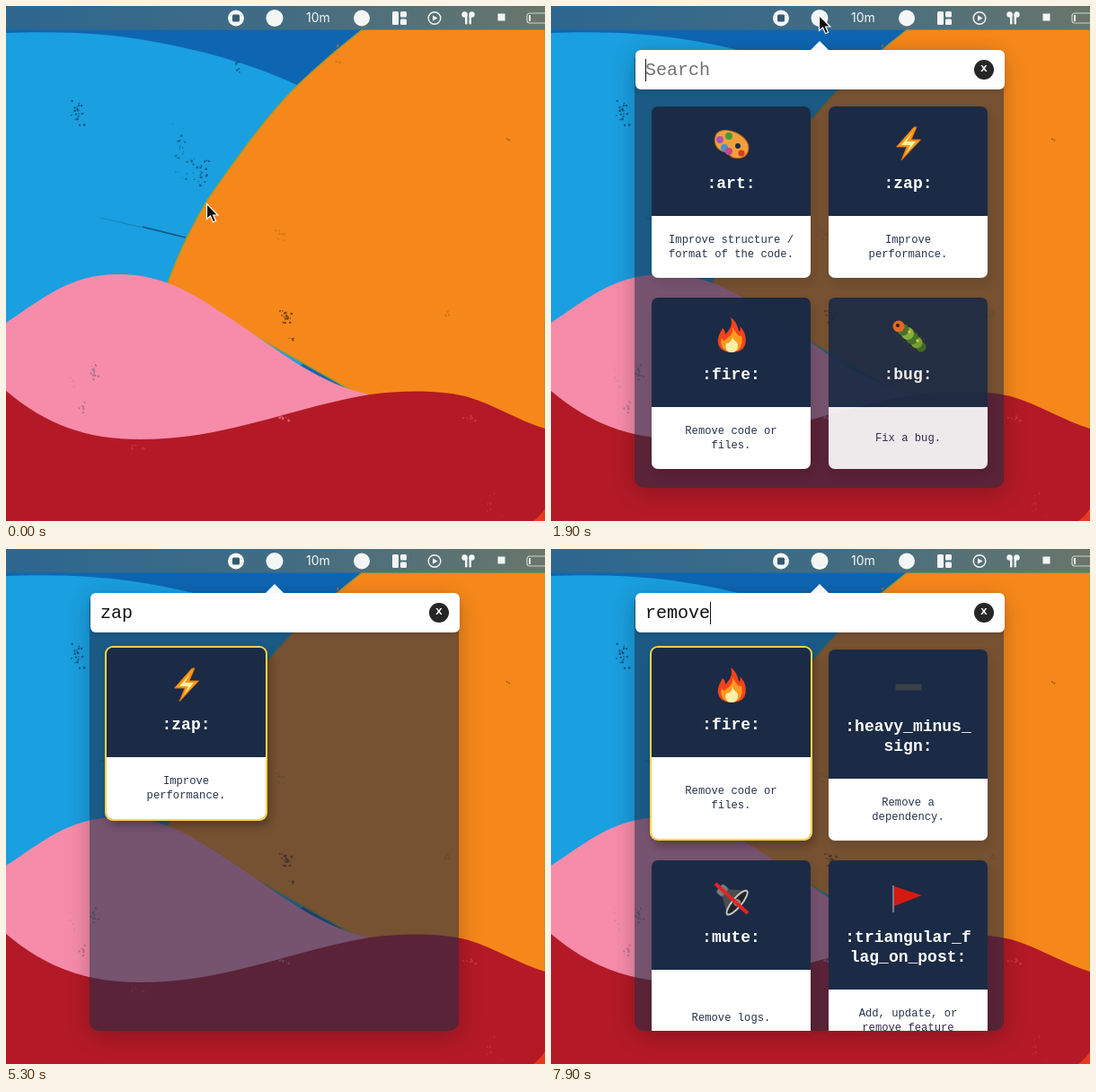
An HTML page for the animation above (8 s loop, 600 by 574 pixels).

```html
<!DOCTYPE html>
<html lang="en">
<head>
<meta charset="utf-8">
<title>Emoji search popup</title>
<style>
  html, body { margin: 0; width: 100%; height: 100%; overflow: hidden; }
  #stage { position: relative; width: 600px; height: 574px; overflow: hidden; font-family: "Liberation Mono", monospace; }
  #stage > svg, #popup, #popup > * { position: absolute; }
  #stage > svg { left: 0; top: 0; }
  #panel { left: 93px; top: 49px; width: 411px; height: 488px; border-radius: 10px;
    background: rgba(26, 42, 68, .58); overflow: hidden; }
  #shade { left: 93px; top: 49px; width: 411px; height: 488px; border-radius: 10px; }
  #grid { position: absolute; left: 19px; top: 63px; display: grid; grid-template-columns: 177px 177px; gap: 22px 20px; }
  #bar { left: 93.5px; top: 49px; width: 411px; height: 44px; border-radius: 6px; background: #fff;
    box-shadow: 0 2px 5px rgba(0, 0, 0, .12); }
  #tip { left: 288px; top: 38.5px; border: solid transparent; border-width: 0 11px 11px; border-bottom-color: #fff; }
  #query { left: 105px; top: 60px; font-size: 20px; line-height: 24px; white-space: pre; }
  #caret { top: 59px; width: 1.5px; height: 25px; background: #111; }
  #close { left: 471px; top: 60px; width: 22px; height: 22px; border-radius: 50%; background: #262626; color: #fff;
    font: bold 13px/20px "Liberation Mono", monospace; text-align: center; }
  .card { display: flex; flex-direction: column; border-radius: 7px; overflow: hidden; text-align: center; white-space: pre-line; }
  .head { box-sizing: border-box; padding: 18px 0 25px; background: #1b2b45; color: #fff; font: bold 18px/22px "Liberation Mono", monospace; }
  .head svg { display: block; margin: 0 auto 9px; }
  .body { flex: 1; display: flex; align-items: center; justify-content: center; padding: 18.5px 0; background: #fff;
    color: #26334d; font-size: 12.2px; line-height: 16px; }
</style>
</head>
<body>
<div id="stage">
  <svg width="600" height="574">
    <defs>
      <linearGradient id="menu">
        <stop offset="0" stop-color="#2c6790"/><stop offset=".5" stop-color="#416c84"/><stop offset="1" stop-color="#69766a"/>
      </linearGradient>
    </defs>
    <rect width="600" height="574" fill="#0e66b2"/>
    <path d="M0 30C60 28 110 30 160 39S270 62 330 91V400H0Z" fill="#1a9fe0"/>
    <path d="M397 26C370 47 347 67 325 88C290 122 258 168 225 215C205 248 190 280 179 312L405 440L600 480V26Z"
      fill="#f6881b" stroke="#a39a2b" stroke-width="1.5"/>
    <path d="M0 353C40 327 70 299 125 299S215 325 260 355S350 422 405 433L300 500H0Z" fill="#f68caa"/>
    <path d="M0 429C45 467 90 483 150 483C245 483 320 447 405 433C440 428 487 428 515 436C545 445 570 462 600 471V574H0Z" fill="#b41a26"/>
    <path d="M587 574Q595 568 600 560V574Z" fill="#e6391f"/>
    <path d="M105 236L200 258" stroke="#0d3f68" stroke-width=".8" opacity=".4"/>
    <path d="M152 246L200 258" stroke="#0d3450" stroke-width="1.6" opacity=".6"/>
    <g id="specks"></g>
    <rect width="600" height="26.5" fill="url(#menu)"/>
    <g fill="#f4f6f6">
      <circle cx="256" cy="13.5" r="9"/><rect x="252" y="9.5" width="8" height="8" rx="1.5" fill="#345a72"/>
      <circle cx="299" cy="13.5" r="9.5"/>
      <text x="334" y="18" font-family="Inter, sans-serif" font-size="14">10m</text>
      <circle cx="396" cy="13.5" r="9"/>
      <rect x="430" y="6" width="7" height="15" rx="1.5"/>
      <rect x="439" y="6" width="7" height="6.5" rx="1.5"/><rect x="439" y="14.5" width="7" height="6.5" rx="1.5"/>
      <circle cx="477" cy="13.5" r="6.8" fill="none" stroke="#f4f6f6" stroke-width="1.4"/><path d="M475 10.2L480.5 13.5L475 16.8Z"/>
      <circle cx="510.5" cy="9.5" r="3.2"/><circle cx="518.5" cy="9.5" r="3.2"/>
      <rect x="511" y="9" width="2.5" height="11.5" rx="1"/><rect x="515.5" y="9" width="2.5" height="11.5" rx="1"/>
      <rect x="547.5" y="8.5" width="8" height="8"/>
      <rect x="580" y="8" width="26" height="11" rx="3" fill="none" stroke="#cdd3cf" stroke-width="1.2"/>
      <rect x="582" y="10" width="2" height="7"/>
    </g>
  </svg>
  <div id="popup">
    <div id="shade"></div>
    <div id="panel"><div id="grid"></div></div>
    <div id="tip"></div><div id="bar"></div>
    <div id="query"></div><div id="caret"></div><div id="close">x</div>
  </div>
  <svg width="600" height="574">
    <path id="mouse" d="M0 0V17L4 13.5L7 20.3L10 19L7.2 12.5H12.3Z" fill="#111" stroke="#fff" stroke-width="1.2"/>
  </svg>
</div>
<script>
const $ = id => document.getElementById(id);
const clamp = x => Math.max(0, Math.min(1, x));
const ease = x => { x = clamp(x); return x * x * (3 - 2 * x); };
const mix = (a, b, k) => a + (b - a) * k;

const LOOP = 8000, OPEN = 1500, HIDE_MOUSE = 3900;

// Worn print specks: x, y, spread x, spread y, count, colour
let seed = 7;
const rand = () => (seed = seed * 16807 % 2147483647) / 2147483647;
const specks = [
  [79, 117, 9, 18, 24, '#0d3c5c'], [192, 165, 9, 42, 22, '#0f5b8a'], [216, 182, 12, 18, 22, '#0d4a72'],
  [256, 68, 5, 8, 7, '#0d4a80'], [310, 346, 8, 8, 20, '#5a2c0c'], [318, 370, 5, 5, 7, '#6b3510'],
  [303, 255, 9, 9, 10, '#cf7419'], [556, 148, 4, 2, 4, '#9c5a1c'], [490, 343, 3, 6, 4, '#c9741b'],
  [368, 52, 6, 12, 8, '#b86f22'], [98, 407, 7, 9, 14, '#8a6a86'], [84, 445, 5, 8, 8, '#a76f88'],
  [73, 410, 5, 16, 8, '#d983a0'], [310, 459, 9, 3, 8, '#dd7d92'], [145, 491, 12, 4, 8, '#cf3a4e'],
  [515, 459, 9, 3, 7, '#cf3d4a'], [540, 555, 14, 16, 10, '#c52b33']
];
const scatter = () => rand() + rand() - 1;
$('specks').innerHTML = specks.map(([x, y, w, h, n, color]) => {
  let d = '';
  for (let i = 0; i < n; i++) {
    const size = .8 + rand() * 1.7;
    d += `M${x + w * scatter()} ${y + h * scatter()}h${size}v${size}h${-size}z`;
  }
  return `<path d="${d}" fill="${color}" opacity=".75"/>`;
}).join('');

const dots = list => list.map(([x, y, r, c]) => `<circle cx="${x}" cy="${y}" r="${r}" fill="${c}"/>`).join('');
const icons = {
  art: `<g transform="rotate(22)"><path d="M-20 -2C-20 -18 18 -18 20 0C21 11 8 15 2 12C-2 9 -4 12 -9 11C-15 10 -20 5 -20 -2Z"
    fill="#f0a03c" stroke="#b8661c"/></g>` +
    dots([[-13, -5, 4, '#a855b8'], [-3, -9, 4, '#3f9c3c'], [-8, 4, 4, '#4a8fc9'], [-3, 8, 4, '#c8468c'], [11, 10, 3.6, '#d63a24'], [7, 2, 3, '#1b2b45']]),
  zap: `<path d="M6 -19L-13.5 3H-2L-8 18L13.5 -5H3L9 -19Z" fill="#f79a1c" stroke="#d96c12" stroke-linejoin="round"/>
    <path d="M4 -13L-8 1H2L-3 11L8 -3H-2Z" fill="#fff0a0"/>`,
  fire: `<path d="M-1 -20C8 -13 6 -7 9 -4C10 -6 10 -8 9 -10C17 -3 17 8 14 13C10 21 -10 21 -14 12C-18 3 -11 -5 -10 -8C-7 -5 -7 -3 -7 -1C-2 -6 2 -12 -1 -20Z" fill="#f4431c"/>
    <path d="M1 -9C5 -2 9 3 11 0C14 13 7 19 0 19S-14 13 -11 3C-9 7 -7 6 -6 4C-1 1 2 -3 1 -9Z" fill="#ff9a1f"/>
    <path d="M1 2C3 7 7 7 7 11C7 17 4 19 0 19S-8 16 -6 9C-2 9 0 6 1 2Z" fill="#fff0a8"/>`,
  bug: `<path d="M-11 -8L15 16M-14 0L8 18M-3 -12L19 6" stroke="#4a351c" stroke-width="2" stroke-dasharray="2 3"/>` +
    dots([[14, 13, 5.5, '#3d6b23'], [9, 8, 6.5, '#72a832'], [4, 3, 7, '#3f7427'], [-1, -2, 7, '#86b93a'], [-6, -6, 6.5, '#43762a'],
      [-11, -10, 6.5, '#ee6b22'], [-12, -11, 2, '#2a1710'], [1, -4, 1.7, '#e4d24a'], [10, 6, 1.7, '#e4d24a']]),
  minus: `<rect x="-14.5" y="-3.5" width="29" height="7" fill="#3b4049"/>`,
  mute: `<g transform="rotate(40)"><path d="M-17 -6H-8L8 -17V17L-8 6H-17Z" fill="#4b4d50"/><rect x="-18" y="-6" width="9" height="12" rx="3" fill="#777a7d"/>
    <ellipse cx="8" rx="5" ry="17" fill="#222" stroke="#c3c6c8" stroke-width="2"/><circle cx="8" r="4" fill="#85888a"/></g>
    <path d="M-18 -16L18 17" stroke="#e02424" stroke-width="4"/>`,
  flag: `<path d="M-17 -14V16" stroke="#8d9299" stroke-width="1.6"/><path d="M-16 -13L15 -3L-16 9Z" fill="#d51a12"/>`
};
const texts = {
  art: [':art:', 'Improve structure /\nformat of the code.'],
  zap: [':zap:', 'Improve\nperformance.'],
  fire: [':fire:', 'Remove code or\nfiles.'],
  bug: [':bug:', 'Fix a bug.'],
  minus: [':heavy_minus_\nsign:', 'Remove a\ndependency.'],
  mute: [':mute:', 'Remove logs.'],
  flag: [':triangular_f\nlag_on_post:', 'Add, update, or\nremove feature\nflags.']
};
const cards = {};
for (const key in texts) {
  const [label, note] = texts[key];
  const card = cards[key] = document.createElement('div');
  card.className = 'card';
  card.innerHTML = `<div class="head"><svg width="48" height="48" viewBox="-24 -24 48 48" fill="none">${icons[key]}</svg>${label}</div><div class="body">${note}</div>`;
  $('grid').append(card);
}

// Each step: start time, query, visible cards, highlighted card
const all = ['art', 'zap', 'fire', 'bug'], removal = ['fire', 'minus', 'mute', 'flag'];
const steps = [
  [0, '', all, null],
  [4000, 'z', ['zap'], 'zap'], [4200, 'za', ['zap'], 'zap'], [4350, 'zap', ['zap'], 'zap'],
  [6200, '', all, 'art'],
  [6850, 'r', all, 'art'], [6980, 're', all, 'art'], [7120, 'rem', removal, 'fire'],
  [7250, 'remo', removal, 'fire'], [7380, 'remov', removal, 'fire'], [7520, 'remove', removal, 'fire']
];

function showCards(t, now, before) {
  const [start, , visible, picked] = now;
  for (const key in cards) {
    const { style } = cards[key], i = visible.indexOf(key);
    style.display = i < 0 ? 'none' : 'flex';
    if (i < 0) continue;
    const to = +(picked === key);
    const from = before[2].includes(key) ? +(before[3] === key) : to;
    const k = mix(from, to, ease((t - start) / 200));
    const fade = 1 - clamp((t - OPEN - 50 - 60 * i) / 250);
    style.order = i;
    style.opacity = 1 - fade * fade;
    style.transform = `translateY(${-2 * k}px)`;
    style.boxShadow = `0 0 0 2px rgba(255, 214, 64, ${k}), 3px 6px 12px rgba(0, 0, 0, ${.1 + .25 * k})`;
  }
}

function render(t) {
  const go = ease((t - 100) / 900), drop = ease((t - 3000) / 300);
  $('mouse').setAttribute('transform', `translate(${mix(223.5, 298.5, go)} ${mix(220.5, 10.5, go) + 20.5 * drop})`);
  $('mouse').style.display = t < HIDE_MOUSE ? '' : 'none';

  $('popup').style.display = t < OPEN ? 'none' : '';
  const i = steps.findLastIndex(s => s[0] <= t), now = steps[i];
  showCards(t, now, steps[Math.max(0, i - 1)]);

  const text = now[1];
  $('query').textContent = text || 'Search';
  $('query').style.color = text ? '#111' : '#707070';
  // The blink restarts with every typed letter
  const typed = steps.findLast(s => s[0] <= t && s[1]);
  const since = t - (typed ? typed[0] : OPEN);
  $('caret').style.left = 104.5 + 12 * text.length + 'px';
  $('caret').style.display = since % 1000 < 500 ? '' : 'none';
}

$('shade').style.boxShadow = '0 5px 26px rgba(0, 0, 0, .24)';
(function tick() {
  render(performance.now() % LOOP);
  requestAnimationFrame(tick);
})();
</script>
</body>
</html>
```
